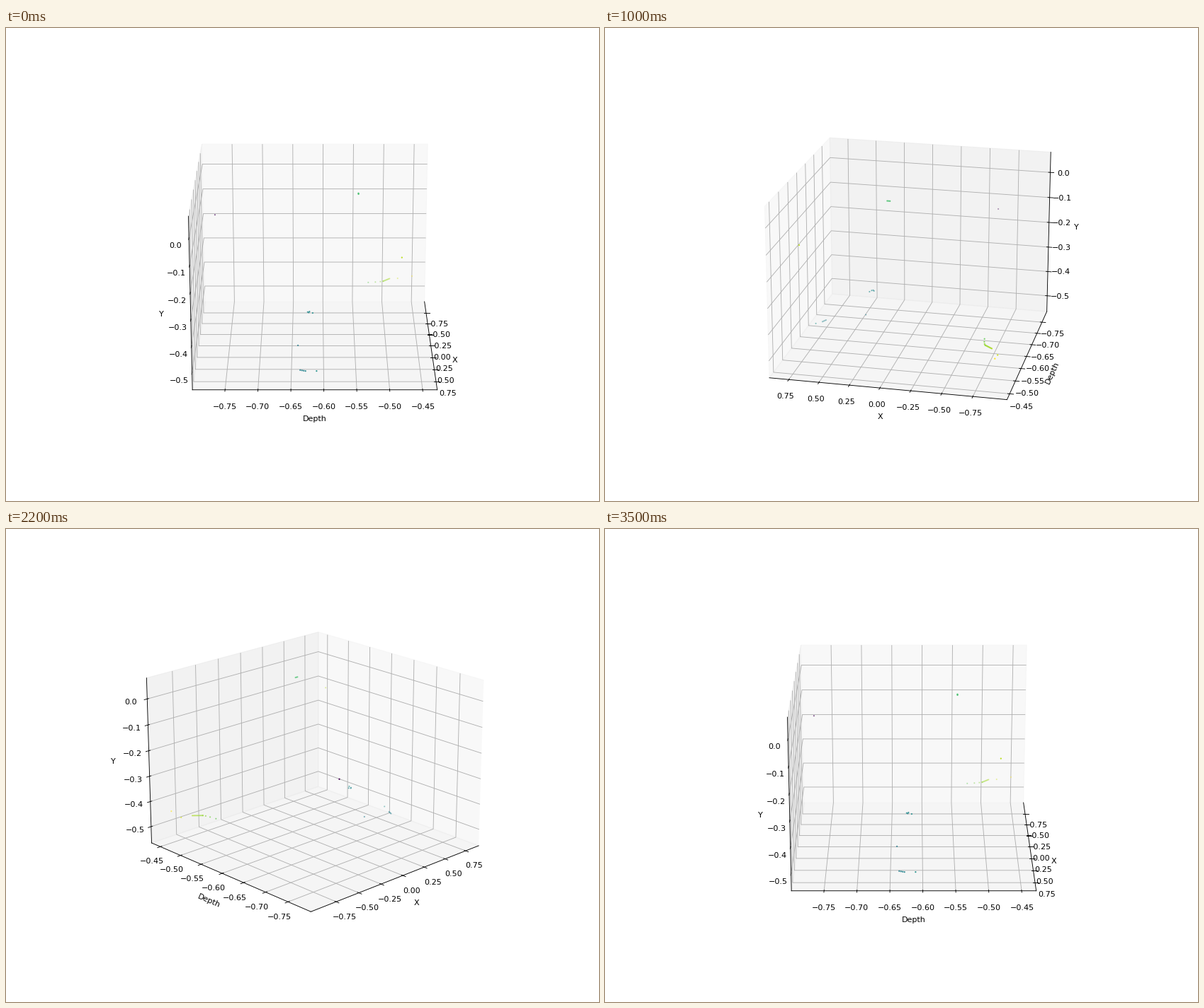
These frames come from a looping animation (837 by 669 pixels, 3.6 s). A matplotlib script:

```python
import numpy as np
import matplotlib.pyplot as plt
from matplotlib.animation import FuncAnimation

DPI = 80
FRAMES = 36


def strand(start, end, count, bend=0.0):
    """Evenly spaced points from start to end, bowed along the depth axis."""
    t = np.linspace(0, 1, count)
    pts = np.linspace(start, end, count)
    pts[:, 1] += bend * 4 * t * (1 - t)
    return pts


# Each point is (X, depth, Y)
tail, elbow, tip = (-0.742, -0.525, -0.438), (-0.773, -0.500, -0.438), (-0.837, -0.489, -0.438)
singles = [(-0.601, -0.776, -0.142), (0.725, -0.483, -0.100),
           (0.392, -0.640, -0.492), (0.789, -0.611, -0.517)]

points = np.vstack([
    singles,
    strand((0.296, -0.622, -0.377), (0.328, -0.617, -0.377), 4, bend=-0.005),
    strand((0.060, -0.546, 0.039), (0.082, -0.546, 0.039), 3),
    strand((0.736, -0.636, -0.5235), (0.755, -0.628, -0.5235), 4),
    strand(tail, elbow, 4, bend=0.004),
    strand(elbow, tip, 9),
    strand((-0.898, -0.475, -0.447), (-0.899, -0.451, -0.438), 2),
])
x, depth, y = points.T

fig = plt.figure(figsize=(837 / DPI, 669 / DPI), dpi=DPI)
ax = fig.add_subplot(projection="3d")
ax.scatter(x, depth, y, c=depth, cmap="viridis", s=1)

ax.set_xlabel("X", labelpad=5)
ax.set_ylabel("Depth", labelpad=5)
ax.set_zlabel("Y", labelpad=5)
ax.tick_params(pad=4)
ax.set(xticks=np.linspace(-0.75, 0.75, 7),
       yticks=np.linspace(-0.75, -0.45, 7),
       zticks=np.linspace(-0.5, 0, 6))
ax.set_xlim(-1.0222, 0.9122)
ax.set_ylim(-0.7995, -0.4278)
ax.set_zlim(-0.5655, 0.0800)


def update(i):
    # One full turn; the tiny offset keeps the side pane on the left at 0 degrees
    azim = i * 360 / (FRAMES - 1) % 360 + 1e-4
    ax.view_init(elev=20, azim=azim)
    return []


anim = FuncAnimation(fig, update, frames=FRAMES, interval=100,
                     repeat=True, repeat_delay=0)
plt.show()
```
